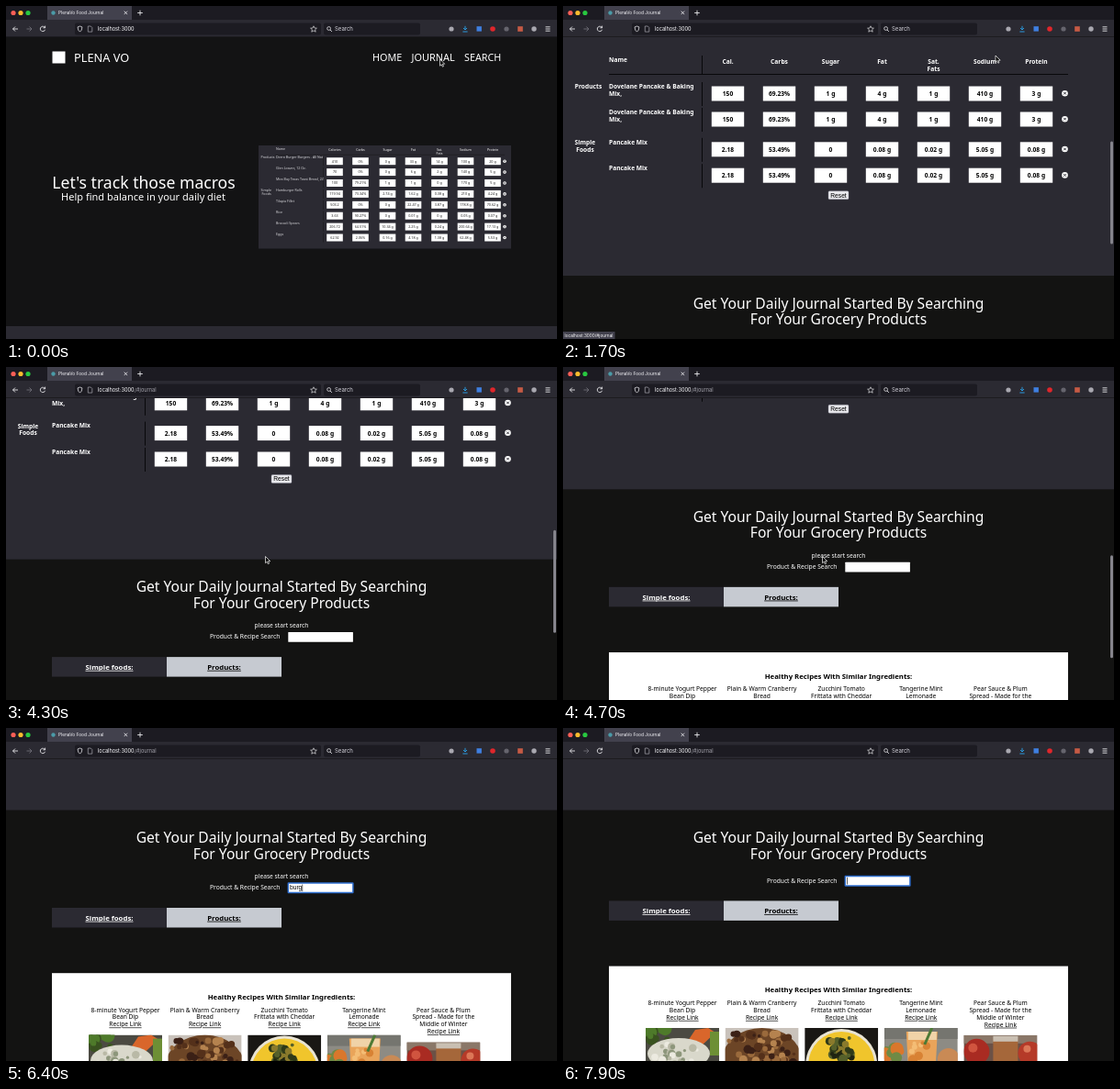
An HTML page that plays this animation: 600 by 363 pixels, repeating every 8000 ms.

```html
<!DOCTYPE html>
<html lang="en">
<head>
<meta charset="utf-8">
<title>Food Journal</title>
<style>
html, body { margin: 0; width: 100%; height: 100%; overflow: hidden; background: #131314; }
svg { display: block; }
text { font-family: 'Noto Sans', 'Open Sans', sans-serif; white-space: pre; }
.ui { font-family: Inter, 'Liberation Sans', sans-serif; }
.form { font-family: 'Liberation Sans', Arial, sans-serif; }
.b { font-weight: 700; }
.u { text-decoration: underline; }
</style>
</head>
<body>
<svg id="stage" width="600" height="363" viewBox="0 0 600 363"></svg>
<script>
const LOOP = 8000, TOP = 34, JOURNAL = 315, SEARCH = 609;
const BODY = 6.67;
const PANEL = '#2b2a32', DARK = '#131312', WHITE = '#fbfbfe';

const rect = (x, y, w, h, fill, extra = '') =>
  `<rect x="${x}" y="${y}" width="${w}" height="${h}" fill="${fill}" ${extra}/>`;
const circle = (x, y, r, fill, extra = '') =>
  `<circle cx="${x}" cy="${y}" r="${r}" fill="${fill}" ${extra}/>`;
const line = (d, stroke = WHITE, width = .8) =>
  `<path d="${d}" fill="none" stroke="${stroke}" stroke-width="${width}"/>`;
// y is the middle of the capitals
const text = (s, x, y, size, { fill = '#fff', anchor = 'start', cls = '', id = '' } = {}) =>
  `<text x="${x}" y="${y + size * .357}" font-size="${size}" fill="${fill}" text-anchor="${anchor}"
    class="${cls}" id="${id}">${s.replace(/&/g, '&amp;')}</text>`;
const mid = (s, x, y, size, opts) => text(s, x, y, size, { anchor: 'middle', ...opts });
const group = (id, y, content) => `<g id="${id}" transform="translate(0 ${y})">${content}</g>`;
const closeIcon = (x, y, r) => circle(x, y, r, '#fff') +
  line(`M${x - r * .4} ${y - r * .4}l${r * .8} ${r * .8}m0 ${-r * .8}l${-r * .8} ${r * .8}`, PANEL, r * .3);

function browserChrome() {
  const ui = (s, x, y, size, fill, id) => text(s, x, y, size, { fill, cls: 'ui', id });
  return rect(0, 0, 600, 15, '#1c1b22') + rect(0, 15, 600, 19, PANEL) +
    rect(0, 33.5, 600, .5, '#0c0c0d') +
    ['#fe5f57', '#febc2e', '#28c840'].map((c, i) => circle(8 + i * 8, 7.5, 2.6, c)).join('') +
    rect(45, 0, 92, 15, '#42414d') + circle(51.5, 7.5, 2.2, '#4b9ba8') +
    ui('PlenaVo Food Journal', 57, 7.6, 4.8, WHITE) +
    line('M128.7 5.7l3.4 3.4m0 -3.4l-3.4 3.4') + line('M143.2 7.5h5.6m-2.8 -2.8v5.6') +
    line('M13 25h-5.5m2.5 -2.5l-2.5 2.5l2.5 2.5') +
    line('M22.5 25h5.5m-2.5 -2.5l2.5 2.5l-2.5 2.5', '#77767f') +
    line('M42.4 23.6a2.7 2.7 0 1 0 .2 2.2m0 -4.2v2.2h-2.2') +
    rect(75, 18.5, 268, 13, '#1c1b22', 'rx="2"') + rect(346, 18.5, 105, 13, '#1c1b22', 'rx="2"') +
    line('M80.5 22l2.4 .9q0 4 -2.4 5.2q-2.4 -1.2 -2.4 -5.2z', WHITE, .7) +
    line('M89.3 22h3l1.5 1.5v4.6h-4.5z', '#a9a8b0', .7) +
    ui('localhost:3000', 100, 25.2, 5.6, WHITE, 'host') +
    ui('/#journal', 140, 25.2, 5.6, '#a5a4ad', 'hash') +
    line('M335 21.8l1 2.2l2.4 .2l-1.8 1.6l.6 2.4l-2.2 -1.3l-2.2 1.3l.6 -2.4l-1.8 -1.6l2.4 -.2z', WHITE, .6) +
    circle(351.6, 24.5, 1.9, 'none', 'stroke="#fbfbfe" stroke-width=".7"') + line('M353 26l1.9 1.9') +
    ui('Search', 358, 25.2, 6, '#d5d4dc') +
    circle(485, 25, 2.6, '#a9a8b0') +
    line('M500 21.8v4.2m-2 -2l2 2l2 -2m-4.6 4h5.2', '#2ba5f0', .9) +
    rect(512.5, 22.2, 5.4, 5.4, '#3f7fe0') + circle(530, 25, 2.8, '#e0262b') +
    circle(545, 25, 2.6, '#66656e') + rect(557.2, 22.2, 5.6, 5.6, '#c65a45') +
    circle(575, 25, 2.7, '#a9a8b0') + line('M587.5 22.8h5m-5 2.2h5m-5 2.2h5');
}

function miniTable() {
  const tiny = (s, x, y) => text(s, x, y, 3.6, { fill: '#d8d8dc' });
  const cols = [358, 386, 415.5, 443.5, 472, 500.5, 530];
  const rows = [
    'Dorro Burger Burgers - All Nat|410|0%|0 g|33 g|14 g|100 g|20 g',
    'Glen Loaves, 12 Oz.|70|0%|0 g|6 g|2 g|140 g|5 g',
    'Mira Bay Texas Toast Bread, 24|100|79.21%|1 g|1 g|0 g|170 g|5 g',
    'Hamburger Rolls|119.94|73.34%|2.74 g|1.62 g|0.38 g|210 g|4.24 g',
    'Tilapia Fillet|503.2|0%|0 g|22.47 g|3.87 g|178.8 g|70.62 g',
    'Rice|3.63|90.27%|0 g|0.01 g|0 g|0.05 g|0.07 g',
    'Broccoli Spears|206.72|64.51%|10.34 g|2.25 g|0.24 g|200.64 g|17.13 g',
    'Eggs|62.92|2.06%|0.16 g|4.18 g|1.38 g|62.48 g|5.53 g'];
  const heads = ['Calories', 'Carbs', 'Sugar', 'Fat', 'Sat.', 'Sodium', 'Protein'];
  return rect(275, 152, 275, 112.5, PANEL) + tiny('Name', 294, 156) +
    heads.map((h, i) => mid(h, cols[i], 156.5, 3.6)).join('') + mid('Fats', 472, 160.5, 3.6) +
    line('M293 162.3h250', '#111', .4) +
    tiny('Products', 277.5, 165) + tiny('Simple', 277.5, 200.5) + tiny('Foods', 278.5, 204.5) +
    rows.map((row, r) => {
      const [name, ...cells] = row.split('|'), y = 169.2 + r * 11.9;
      return tiny(name, 294, 165 + r * 11.9) + line(`M345.5 ${y - 5}v10`, '#111', .4) +
        cells.map((c, i) => rect(cols[i] - 8.8, y - 4, 17.6, 8, '#fff') +
          mid(c, cols[i], y, 3.7, { fill: '#222' })).join('') + closeIcon(543, y, 1.8);
    }).join('');
}

function home() {
  return rect(0, 0, 600, 349, '#131314') + rect(50.5, 49.5, 14, 13, '#fff') +
    text('PLENA VO', 74, 56, 12.75) + text('HOME', 399, 56.5, 10.8) +
    text('JOURNAL', 441.5, 56.5, 10.9) + text('SEARCH', 499, 56.5, 10.8) +
    mid("Let's track those macros", 150, 193, 17.6) +
    mid('Help find balance in your daily diet', 149.5, 208.5, 11) + miniTable();
}

function journal() {
  const bold = (s, x, y) => text(s, x, y, BODY, { cls: 'b' });
  const boldMid = (s, x, y, fill) => mid(s, x, y, BODY, { cls: 'b', fill });
  const colX = i => 179.5 + i * 56;
  const product = ['150', '69.23%', '1 g', '4 g', '1 g', '410 g', '3 g'];
  const simple = ['2.18', '53.49%', '0', '0.08 g', '0.02 g', '5.05 g', '0.08 g'];
  const row = (names, cells, y) => line(`M151.5 ${y - 12.5}v26`, '#08080a', 1) +
    names.map((n, i) => bold(n, 50, y - 8 + i * 8)).join('') +
    cells.map((c, i) => rect(colX(i) - 17.7, y - 8, 35.4, 16, '#fff') +
      boldMid(c, colX(i), y + .3, '#000')).join('') + closeIcon(546.5, y - .3, 3.3);
  const mix = ['Dovelane Pancake & Baking', 'Mix,'];
  return rect(0, TOP, 600, 260, PANEL) + bold('Name', 50, 58.5) +
    ['Cal.', 'Carbs', 'Sugar', 'Fat', 'Sat.', 'Sodium', 'Protein']
      .map((h, i) => boldMid(h, colX(i), 60.5)).join('') + boldMid('Fats', colX(4), 68.5) +
    line('M50 74.5h500M151.5 54v20', '#08080a', 1) +
    boldMid('Products', 27.5, 87.5) + boldMid('Simple', 24, 148.5) + boldMid('Foods', 24, 156.3) +
    row(mix, product, 95.5) + row(mix, product, 123.5) +
    row(['Pancake Mix'], simple, 156.3) + row(['Pancake Mix'], simple, 184.7) +
    rect(289, 201.7, 22, 9, '#e9e9ed', 'rx="1.3" stroke="#8f8f9d" stroke-width=".4"') +
    mid('Reset', 300, 206.2, BODY, { fill: '#000', cls: 'form' });
}

// scattered patches from a small seeded generator
function patches(n, seed, colors, x, y, w, h, r) {
  const rnd = () => (seed = (seed * 16807) % 2147483647) / 2147483647;
  let out = '';
  for (let i = 0; i < n; i++)
    out += circle(x + rnd() * w, y + rnd() * h, r * (.5 + rnd()), colors[i % colors.length]);
  return out;
}

const photos = [
  rect(0, 0, 80, 80, '#4b4a42') + patches(12, 31, ['#4e7a2a', '#39521f'], 0, 0, 24, 14, 5) +
    '<path d="M42 20L54 2L68 0L76 5L58 22z" fill="#d9662b"/>' + rect(70, 4, 10, 26, '#6d8f35') +
    '<ellipse cx="36" cy="28" rx="34" ry="17" fill="#d9d8cb"/>' +
    patches(26, 5, ['#eceae0', '#b9b9a6', '#8d967b'], 10, 16, 50, 24, 3),
  rect(0, 0, 80, 80, '#c9c2bb') + '<ellipse cx="40" cy="34" rx="43" ry="34" fill="#6c4526"/>' +
    patches(90, 77, ['#9a6a3c', '#54301a', '#b5834f', '#3b2016'], 4, 6, 72, 60, 3.2),
  rect(0, 0, 80, 80, '#191714') + circle(40, 40, 39, '#e8e3d2') + circle(40, 40, 36, '#f0c52c') +
    patches(34, 9, ['#2f3a18', '#55602a', '#1f2412', '#8a7a2c'], 27, 10, 28, 24, 3.4),
  rect(0, 0, 80, 80, '#8d8b84') + rect(0, 0, 80, 12, '#75756f') +
    patches(10, 21, ['#d9772c', '#6f8a45'], 0, 22, 18, 14, 5) +
    '<path d="M24 4H58L54 80H28z" fill="#e9a45a"/>' + rect(26, 4, 31, 9, '#f0d3a8') +
    patches(8, 3, ['#f4bd75', '#d88234'], 30, 16, 20, 24, 4) +
    line('M52 0L44 18', '#4d7a35', 3) + circle(70, 34, 12, '#c98a55'),
  rect(0, 0, 80, 80, '#6b5146') + rect(0, 0, 80, 9, '#8a7768') +
    circle(14, 18, 14, '#a92b22') + circle(10, 14, 5, '#d0543f') +
    rect(32, 3, 27, 60, '#a5673a', 'rx="3"') + rect(32, 1, 27, 6, '#c9bfb2') +
    circle(72, 20, 13, '#b53a28') + circle(69, 15, 4, '#dc7757')
];

function recipes() {
  const titles = [
    ['8-minute Yogurt Pepper', 'Bean Dip'], ['Plain & Warm Cranberry', 'Bread'],
    ['Zucchini Tomato', 'Frittata with Cheddar'], ['Tangerine Mint', 'Lemonade'],
    ['Pear Sauce & Plum', 'Spread - Made for the', 'Middle of Winter']];
  const black = { fill: '#000' };
  return rect(50, 177.5, 500, 130, '#fff') +
    mid('Healthy Recipes With Similar Ingredients:', 300, 203.3, 7.75, { ...black, cls: 'b' }) +
    titles.map((lines, i) => {
      const x = 130 + i * 86.6, end = 217.5 + lines.length * 7.8;
      return lines.map((s, k) => mid(s, x, 217.5 + k * 7.8, BODY, black)).join('') +
        mid('Recipe Link', x, end + .3, BODY, { ...black, cls: 'u' }) +
        `<svg x="${x - 40}" y="${end + 11.8}" width="80" height="76">${photos[i]}</svg>`;
    }).join('');
}

function search() {
  const tab = (s, x, bg, fill) => rect(x, 106.3, 125, 21.5, bg) +
    mid(s, x + 62.5, 117.2, 7.8, { fill, cls: 'b u' });
  return rect(0, 0, 600, 360, DARK) +
    mid('Get Your Daily Journal Started By Searching', 300, 30, 15.64) +
    mid('For Your Grocery Products', 300, 47.3, 15.64) +
    mid('please start search', 300, 72, BODY, { id: 'hint' }) +
    group('form', 0, text('Product & Recipe Search', 222, 84.2, BODY) +
      rect(307.3, 79.3, 70.6, 10.6, '#fff', 'id="field" rx=".5" stroke-width="1.5"') +
      text('', 309, 84.4, BODY, { fill: '#000', cls: 'form', id: 'typed' }) +
      rect(309, 80.8, .6, 7.6, '#000', 'id="caret"') +
      tab('Simple foods:', 50, PANEL, '#fff') + tab('Products:', 175, '#c6cad1', '#000') + recipes());
}

document.getElementById('stage').innerHTML =
  group('page', 0, home() + group('journal', JOURNAL, journal()) + group('search', SEARCH, search())) +
  rect(596, 0, 3, 112, '#85848c', 'id="thumb" rx="1.5"') +
  `<g id="status">${rect(0, 355, 56.5, 8, '#42414d')}${text('localhost:3000/#journal', 1.5, 359.2, 4.7, { cls: 'ui' })}</g>` +
  browserChrome() +
  '<path id="cursor" d="M0 0V7.2L1.7 5.7L2.8 8.2L4 7.7L2.9 5.2H5.2z" fill="#000" stroke="#fff" stroke-width=".7"/>';

const el = id => document.getElementById(id);
const show = (id, on) => el(id).setAttribute('visibility', on ? 'visible' : 'hidden');
const move = (id, x, y) => el(id).setAttribute('transform', `translate(${x} ${y})`);

// linear interpolation through [time, value] points
function track(points, t) {
  let [t0, v0] = points[0];
  for (const [t1, v1] of points) {
    if (t < t1) return v0 + (v1 - v0) * Math.max(0, (t - t0) / (t1 - t0));
    [t0, v0] = [t1, v1];
  }
  return v0;
}
const scrollPath = [[4000, 0], [4100, 32], [4300, 84], [4700, 160.3], [4900, 188], [5100, 204.3]];
const cursorX = [[1300, 472.5], [1400, 471], [1800, 471], [2000, 400], [2300, 282.5], [5000, 282.5], [5450, 338]];
const cursorY = [[1300, 58], [1400, 54], [1800, 54], [2000, 120], [2300, 206.5], [5000, 206.5], [5450, 172]];
const JUMP = 1600, FOCUS = 5500, TYPE = 5780, SUBMIT = 7300;
el('host').textContent = 'localhost:3000';

function draw(t) {
  const scroll = t < JUMP ? 0 : JOURNAL + track(scrollPath, t);
  move('page', 0, -scroll);
  el('thumb').setAttribute('y', TOP + scroll * .36);
  show('thumb', t >= JUMP && t < 5700);
  show('status', t >= 1400 && t < 1900);
  show('hash', t >= 1800);
  move('cursor', track(cursorX, t), track(cursorY, t));
  show('cursor', t < TYPE);

  const focused = t >= FOCUS, sent = t >= SUBMIT;
  const count = sent ? 0 : Math.max(0, Math.floor((t - TYPE) / 150));
  el('typed').textContent = 'burger'.slice(0, count);
  el('caret').setAttribute('x', 309.2 + el('typed').getComputedTextLength());
  show('caret', focused && (t < SUBMIT - 400 || t >= SUBMIT));
  el('field').setAttribute('stroke', focused ? '#2f6fd0' : 'none');
  show('hint', !sent);
  move('form', 0, sent ? -7.6 : 0);
}

function tick() {
  draw(performance.now() % LOOP);
  requestAnimationFrame(tick);
}
tick();
</script>
</body>
</html>
```
